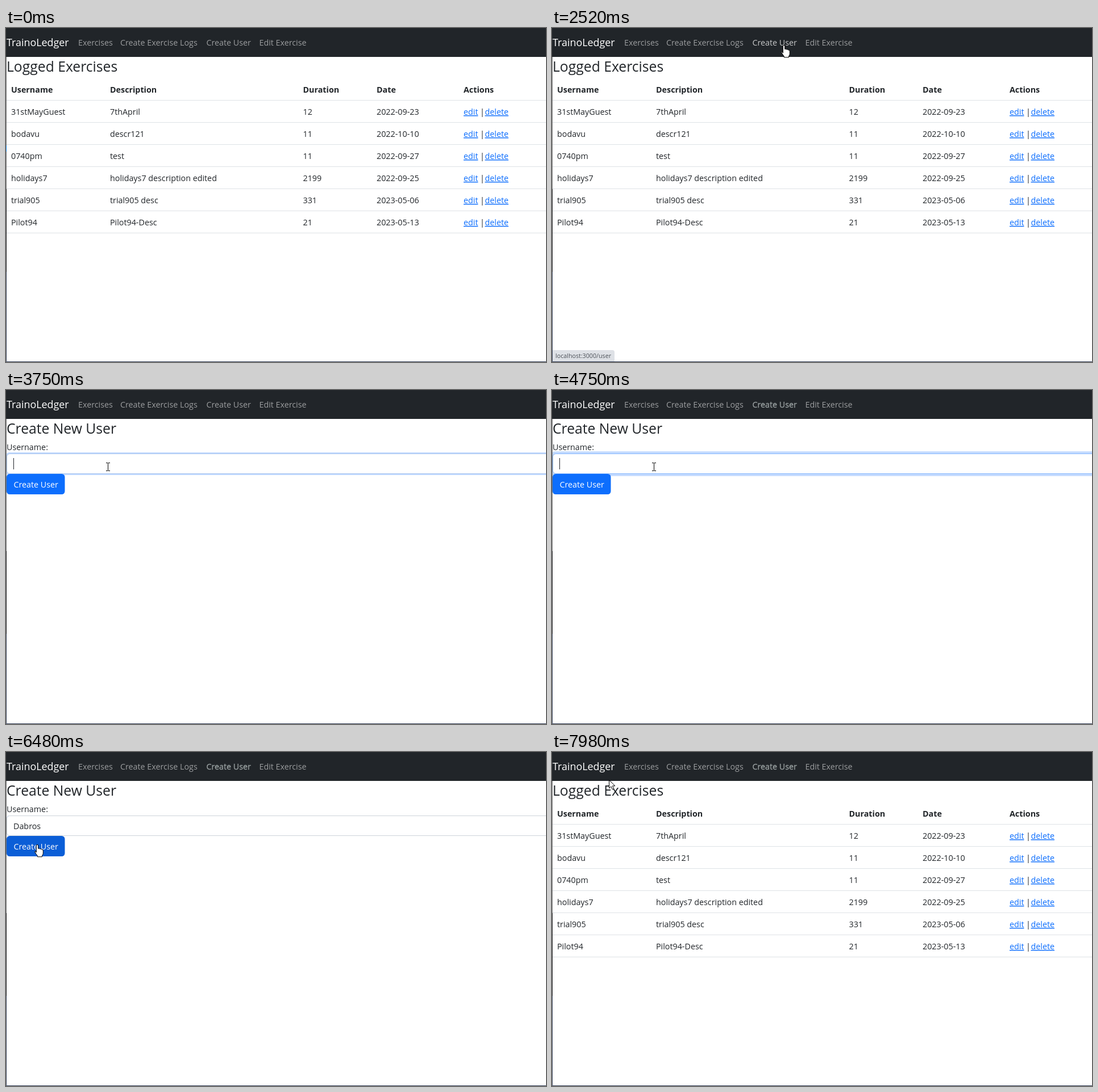
Recreate the animation shown at these times as an HTML page. Size 950 by 589 pixels, loop 8000 ms.

```html
<!DOCTYPE html>
<html lang="en">
<head>
<meta charset="utf-8">
<title>Exercise log</title>
<style>
  html, body { margin: 0; width: 100%; height: 100%; overflow: hidden; background: #fff; }
  svg { display: block; font: 14.3px "Open Sans", "Noto Sans", sans-serif; fill: #212529; }
  text { white-space: pre; }
  .heading { font-size: 24.7px; }
  .bold { font-weight: 700; }
  .brand { font-size: 17.9px; fill: #fff; }
  .nav { fill: #fff; fill-opacity: .55; }
  .link { fill: #0d6efd; text-decoration: underline; }
  .status { font-size: 10.7px; fill: #4b5057; }
  .white { fill: #fff; }
  .rule { stroke: #dee2e6; }
  #ibeam { mix-blend-mode: difference; fill: none; stroke: #fff; }
  #arrow, #hand { fill: #fff; stroke: #000; stroke-linejoin: round; }
</style>
</head>
<body>
<svg id="stage" width="950" height="589" viewBox="0 0 950 589">
  <rect width="950" height="589" fill="#fff"/>
  <rect width="950" height="51" fill="#212529"/>
  <g id="menu"></g>

  <g id="logs">
    <text class="heading" x="1" y="77">Logged Exercises</text>
    <g id="head"></g>
    <g id="rows"></g>
  </g>

  <g id="form">
    <text class="heading" x="1" y="77">Create New User</text>
    <text x="1" y="106">Username:</text>
    <rect id="ring" fill="#0d6efd" fill-opacity=".25"/>
    <rect x="1.5" y="112.5" width="960" height="35" rx="5" fill="#fff" stroke="#ced4da"/>
    <rect id="focusBorder" x="1.5" y="112.5" width="960" height="35" rx="5" fill="none" stroke="#86b7fe"/>
    <text id="typed" x="13" y="136"></text>
    <rect id="caret" y="120" width="1" height="20"/>
    <rect id="button" x="1" y="148" width="102.5" height="36" rx="5.5"/>
    <text class="white" x="13.5" y="172">Create User</text>
  </g>

  <g id="status">
    <path d="M1 568H106Q110 568 110 572V588H1Z" fill="#dee1e6"/>
    <text class="status" x="6" y="582">localhost:3000/user</text>
  </g>

  <!-- window edge -->
  <path d="M.5 51V284" stroke="#777"/>
  <path d="M.5 284V430" stroke="#1b1c1e"/>
  <path d="M.5 430V588.5H950" fill="none" stroke="#2f3a52"/>
  <path id="edgeMark" d="M.5 207V218" stroke="#1a86e0"/>

  <path id="arrow" d="M.5 .5V15L4 11.8L6.3 17L8.8 16L6.5 10.8H11Z"/>
  <path id="hand" d="M-1.7 14V2Q-1.7 .5 0 .5T1.7 2V7.5Q3.2 6 4.7 8Q6.2 7 7.5 8.8Q10.3 8 10.3 11V15.5Q10.3 18 8.5 19.5V21.8H.3V20Q-1.7 17.5-4 13.8Q-4.8 11.5-3 11.6Z"/>
  <path id="ibeam" d="M-3.5-7H-1Q0-7 0-6Q0-7 1-7H3.5M0-6.5V6.5M-3.5 7H-1Q0 7 0 6Q0 7 1 7H3.5"/>
</svg>
<script>
const LOOP = 8000;
const $ = id => document.getElementById(id);
const columns = [9, 183, 522.5, 652, 805];
const records = [
  ["31stMayGuest", "7thApril", "12", "2022-09-23"],
  ["bodavu", "descr121", "11", "2022-10-10"],
  ["0740pm", "test", "11", "2022-09-27"],
  ["holidays7", "holidays7 description edited", "2199", "2022-09-25"],
  ["trial905", "trial905 desc", "331", "2023-05-06"],
  ["Pilot94", "Pilot94-Desc", "21", "2023-05-13"],
];
const userName = "Dabros";
const keyTimes = [4820, 5020, 5150, 5280, 5480, 5610];

// start, end, destination, time the pointer changes shape, new shape
const startPoint = [797, 534];
const moves = [
  [1130, 1840, 167, 52, 1700, "ibeam"],
  [1970, 2450, 408, 30, 2380, "hand"],
  [2920, 3480, 179, 135, 3340, "ibeam"],
  [6070, 6300, 55, 163, 6210, "hand"],
  [7550, 7980, 100, 49, 7550, "arrow"],
];

const label = (x, y, content, cls = "") =>
  `<text class="${cls}" x="${x}" y="${y}">${content}</text>`;
const rule = y => `<path class="rule" d="M1 ${y}H950"/>`;

$("menu").innerHTML = label(1, 32, "TrainoLedger", "brand") +
  [[127, "Exercises"], [201, "Create Exercise Logs"], [352.5, "Create User"], [445.5, "Edit Exercise"]]
    .map(([x, name]) => label(x, 31, name, "nav")).join("");
$("head").innerHTML = ["Username", "Description", "Duration", "Date", "Actions"]
  .map((name, i) => label(columns[i], 114, name, "bold")).join("") + rule(127.5);
$("rows").innerHTML = records.map((record, r) => {
  const y = 153 + 39 * r;
  return record.map((cell, i) => label(columns[i], y, cell)).join("") +
    label(805, y, "edit", "link") + label(834, y, "|") + label(842.5, y, "delete", "link") +
    rule(y + 13.5);
}).join("");
const userLink = $("menu").children[3];

const show = (id, visible) => $(id).style.display = visible ? "" : "none";
const within = (t, from, to) => t >= from && t < to;
const ramp = (t, from, to) => {
  const p = Math.min(1, Math.max(0, (t - from) / (to - from)));
  return p * p * (3 - 2 * p);
};
const set = (id, attrs) => {
  for (const name in attrs) $(id).setAttribute(name, attrs[name]);
};

function pointerAt(t) {
  let [x, y] = startPoint, shape = "arrow";
  for (const [from, to, endX, endY, swap, nextShape] of moves) {
    if (t < from) break;
    const p = ramp(t, from, to);
    x += (endX - x) * p;
    y += (endY - y) * p;
    if (t >= swap) shape = nextShape;
    else if (t > from + 60) shape = "arrow";
  }
  return { x, y, shape };
}

function drawPointer(t) {
  const { x, y, shape } = pointerAt(t);
  for (const id of ["arrow", "hand", "ibeam"]) show(id, t >= 1130 && id === shape);
  const snap = v => shape === "ibeam" ? Math.floor(v) + .5 : Math.round(v);
  set(shape, { transform: `translate(${snap(x)} ${snap(y)})` });
}

function drawForm(t) {
  const focus = ramp(t, 3660, 3830) - ramp(t, 6330, 6470);
  const spread = 3.8 * focus;
  set("ring", { x: 1 - spread, y: 112 - spread, width: 970, height: 36 + 2 * spread, rx: 5 + spread });
  set("focusBorder", { opacity: focus });

  $("typed").textContent = userName.slice(0, keyTimes.filter(k => t >= k).length);
  show("caret", within(t, 3680, 4220) || within(t, 4750, 6110));
  set("caret", { x: 13 + Math.round($("typed").getComputedTextLength()) });

  const hover = ramp(t, 6220, 6380);
  set("button", { fill: `rgb(${13 - 2 * hover},${110 - 16 * hover},${253 - 38 * hover})` });
}

function draw(t) {
  const onForm = within(t, 2590, 7350);
  show("form", onForm);
  show("logs", !onForm);
  show("rows", !within(t, 7350, 7550));
  show("status", within(t, 2450, 3300));
  show("edgeMark", t < 400);

  userLink.style.fillOpacity = .55 + .2 * (ramp(t, 2380, 2530) - ramp(t, 2970, 3120));
  userLink.style.stroke = t >= 3820 ? "#98a5a4" : "none";
  userLink.style.strokeWidth = .3;

  if (onForm) drawForm(t);
  drawPointer(t);
}

const origin = performance.now();
function tick() {
  draw((performance.now() - origin) % LOOP);
  requestAnimationFrame(tick);
}
tick();
</script>
</body>
</html>
```
